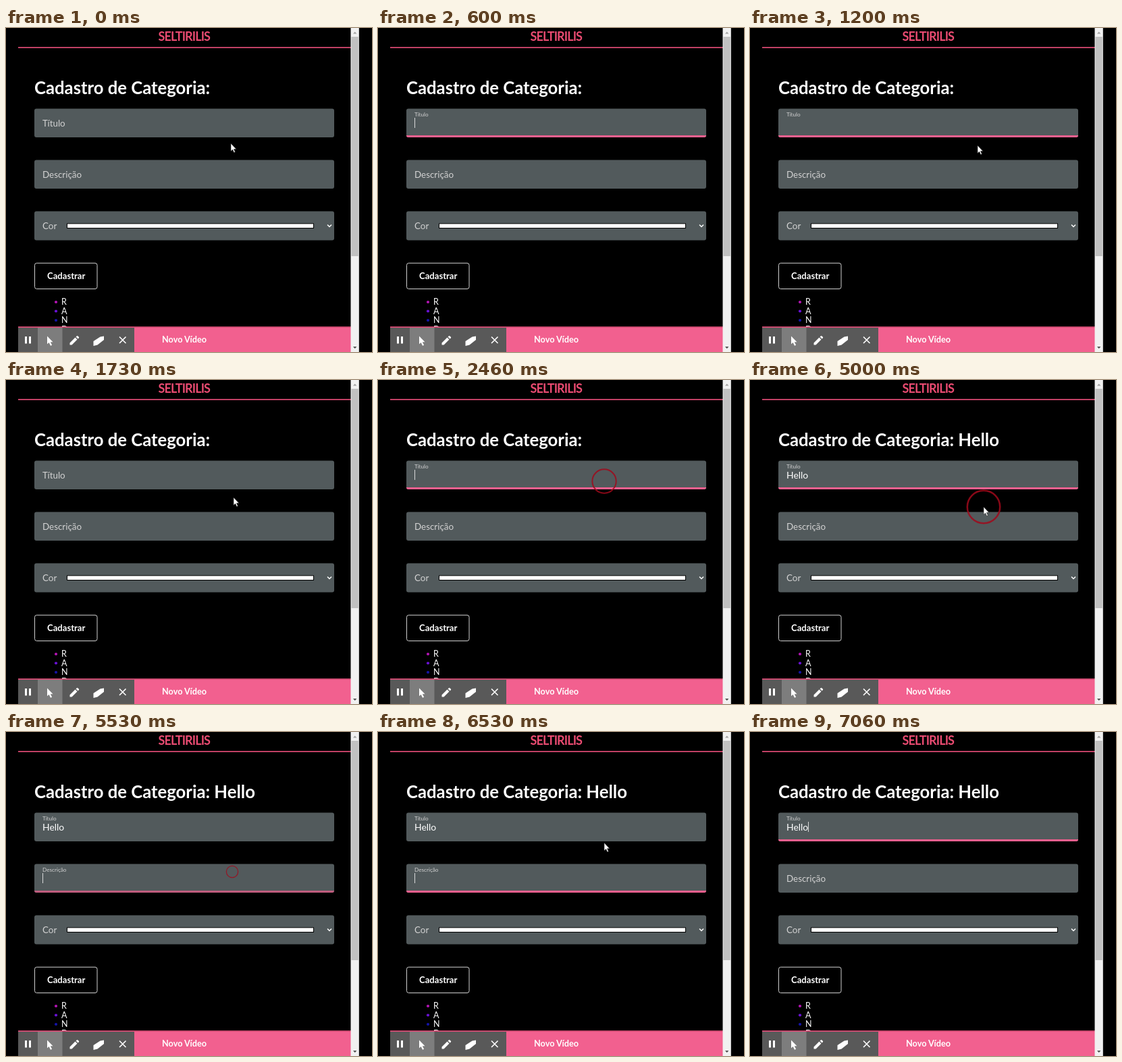
These frames come from a looping animation (542x480 px, 7130 ms). An HTML page:

```html
<!DOCTYPE html>
<html lang="pt">
<head>
<meta charset="utf-8">
<title>Cadastro de Categoria</title>
<style>
html, body { margin: 0; width: 100%; height: 100%; overflow: hidden; background: #000; }
svg { display: block; width: 100vw; height: 100vh; }
text { font-family: Lato, "Open Sans", sans-serif; font-size: 13.9px; fill: #fff; white-space: pre; }
.bold { font-weight: 700; }
.label { font-size: 13.4px; fill: #d2d2d2; }
.field { fill: #525a5c; }
.pink { fill: #f2608f; }
.icon { fill: #fff; }
</style>
</head>
<body>
<svg viewBox="0 0 542 480">
  <rect width="542" height="480"/>

  <text class="bold" x="225.5" y="19" style="font-size:18px;letter-spacing:-.9px;fill:#e94b71">SELTIRILIS</text>
  <rect x="18" y="28" width="493" height="1.8" fill="#d4476f"/>

  <text id="heading" class="bold" x="42" y="98" style="font-size:25.7px"></text>

  <g id="form"></g>

  <rect class="field" x="42" y="271.5" width="444" height="43" rx="3"/>
  <text class="label" x="54" y="298">Cor</text>
  <rect x="90.5" y="289.8" width="365" height="6.7" fill="#fff" stroke="#000"/>
  <path d="M476 291.5l3 3 3-3" fill="none" stroke="#fff" stroke-width="1.5"/>

  <rect x="42.5" y="348.300" width="92.5" height="38.200" rx="3" stroke="#d0d0d0"/>
  <text class="bold" x="61" y="372" style="font-size:13.1px">Cadastrar</text>

  <g id="list"></g>

  <rect class="pink" x="18" y="442.500" width="493" height="37.500"/>
  <rect x="18" y="442.500" width="493" height="1.200" fill="#d4476f"/>
  <text class="bold" x="231" y="466" style="font-size:12.7px">Novo Vídeo</text>

  <rect x="18" y="444" width="172" height="36" fill="#595959"/>
  <rect x="47" y="444" width="36.5" height="36" fill="#7d7d7d"/>
  <path class="icon" d="M28 457h3v10.500h-3zM34 457h3v10.500h-3z"/>
  <path class="icon" d="M61 456.500v11.800l2.600-2.200 2.400 4.700 2.100-1.100-2.300-4.400h3.700z"/>
  <path class="icon" d="M94.500 469.500v-3l8-8 3 3-8 8zM103.500 457.500l1.500-1.300q.8-.5 1.500.2l1.400 1.400q.6.700 0 1.400l-1.400 1.300z"/>
  <path class="icon" d="M129.500 464l10-6.500 5.500-1v5.500l-9.500 7.500-6 1.500z"/>
  <path d="M168 457.500l9.500 9.500m0-9.500l-9.500 9.500" stroke="#fff" stroke-width="1.6"/>

  <rect x="510.500" width="12.300" height="480" fill="#f1f1f1"/>
  <rect x="511.500" y="13" width="10.300" height="325" fill="#c1c1c1"/>
  <path d="M514 8.500l2.700-3 2.700 3z" fill="#a0a0a0"/>
  <path d="M514 472l2.700 3 2.700-3z" fill="#505050"/>

  <rect id="caret" width="1" height="15" fill="#d8d8d8"/>
  <circle id="ring" fill="none" stroke="#a00a1c"/>
  <path id="arrow" d="M0 0V11.500L2.600 9.200 4.600 13.600 6.400 12.800 4.500 8.500H8Z" fill="#fff" stroke="#222" stroke-width=".6"/>
</svg>
<script>
const LOOP = 7130, FADE = 120, RING = 280;
const $ = id => document.getElementById(id);
const clamp = v => Math.max(0, Math.min(1, v));
const mix = (a, b, k) => a + (b - a) * k;
const within = (t, spans) => spans.some(([a, b]) => t >= a && t < b);

function set(el, attrs) {
  for (const k in attrs) el.setAttribute(k, attrs[k]);
}
function add(parent, tag, attrs, text = '') {
  const el = document.createElementNS('http://www.w3.org/2000/svg', tag);
  set(el, attrs);
  el.textContent = text;
  return parent.appendChild(el);
}

const keys = [3530, 3800, 4000, 4200, 4330];   // one letter of "Hello" each
const caretOff = [[930, 1400], [2800, 3330], [4860, 5060], [6000, 6530]];
const clicks = [
  [310, 330, 145], [1400, 337, 174], [2270, 335, 150],
  [4730, 346, 188], [5450, 335, 207], [6780, 335, 148]
];
const path = [
  [0, 333, 171], [60, 333, 171], [300, 330, 145], [930, 330, 145],
  [1200, 337, 174], [1860, 337, 174], [2060, 335, 150], [2600, 335, 150],
  [3060, 346, 188], [5060, 346, 188], [5260, 335, 207], [6400, 335, 207],
  [6600, 335, 148], [LOOP, 335, 148]
];

function makeField(name, y, focus) {
  const form = $('form');
  add(form, 'rect', { class: 'field', x: 42, y, width: 444, height: 42.5, rx: 3 });
  return {
    y, focus,
    line: add(form, 'path', { class: 'pink', d: `M42 ${y + 39.5}h444q0 3-3 3h-438q-3 0-3-3z` }),
    label: add(form, 'text', { class: 'label', x: 54 }, name),
    value: add(form, 'text', { x: 54, y: y + 26 })
  };
}
const fields = [
  makeField('Título', 119.5, [[310, 1400], [2270, 5060], [6780, 9999]]),
  makeField('Descrição', 195.5, [[5450, 6780]])
];

['#b414b4', '#6a12d6', '#1414a8', '#000'].forEach((fill, i) => {
  const y = 406 + i * 13.5;
  add($('list'), 'circle', { cx: 74, cy: y, r: 2.1, fill });
  add($('list'), 'text', { x: 82, y: y + 4.3, style: 'font-size:12.5px' }, 'RAND'[i]);
});

function pointer(t) {
  const i = path.findIndex(p => p[0] > t);
  const [a, b] = [path[i - 1], path[i]];
  const k = clamp((t - a[0]) / (b[0] - a[0]));
  const ease = k * k * (3 - 2 * k);
  return [mix(a[1], b[1], ease), mix(a[2], b[2], ease)];
}

function drawField(f, t, text) {
  const level = Math.max(...f.focus.map(([a, b]) => clamp(Math.min(t - a, b + FADE - t) / FADE)));
  const lift = text ? 1 : clamp(level * 1.6);
  f.line.setAttribute('opacity', level);
  f.label.setAttribute('y', f.y + mix(26, 11, lift));
  f.label.style.fontSize = mix(13.4, 8.2, lift) + 'px';
  f.value.textContent = text;
}

function draw(t) {
  const text = 'Hello'.slice(0, keys.filter(k => t >= k).length);
  $('heading').textContent = 'Cadastro de Categoria: ' + text;
  drawField(fields[0], t, text);
  drawField(fields[1], t, '');

  const active = fields.find(f => within(t, f.focus));
  $('caret').style.display = active && !within(t, caretOff) ? '' : 'none';
  if (active) {
    const width = active.value.textContent ? active.value.getComputedTextLength() : 0;
    set($('caret'), { x: Math.round(54 + width), y: active.y + 13.5 });
  }

  const click = clicks.find(c => t >= c[0] && t < c[0] + RING);
  $('ring').style.display = click ? '' : 'none';
  if (click) {
    const age = t - click[0];
    set($('ring'), {
      cx: click[1], cy: click[2], r: 2 + age * 0.082,
      'stroke-width': mix(0.7, 2.6, age / RING), opacity: 0.85
    });
  }

  // Over a text field the pointer is a dark bar that cannot be seen.
  const [x, y] = pointer(t);
  $('arrow').style.display = y > 162 && y < 195 ? '' : 'none';
  $('arrow').setAttribute('transform', `translate(${x} ${y})`);
}

const start = performance.now();
function tick() {
  draw((performance.now() - start) % LOOP);
  requestAnimationFrame(tick);
}
tick();
</script>
</body>
</html>
```
